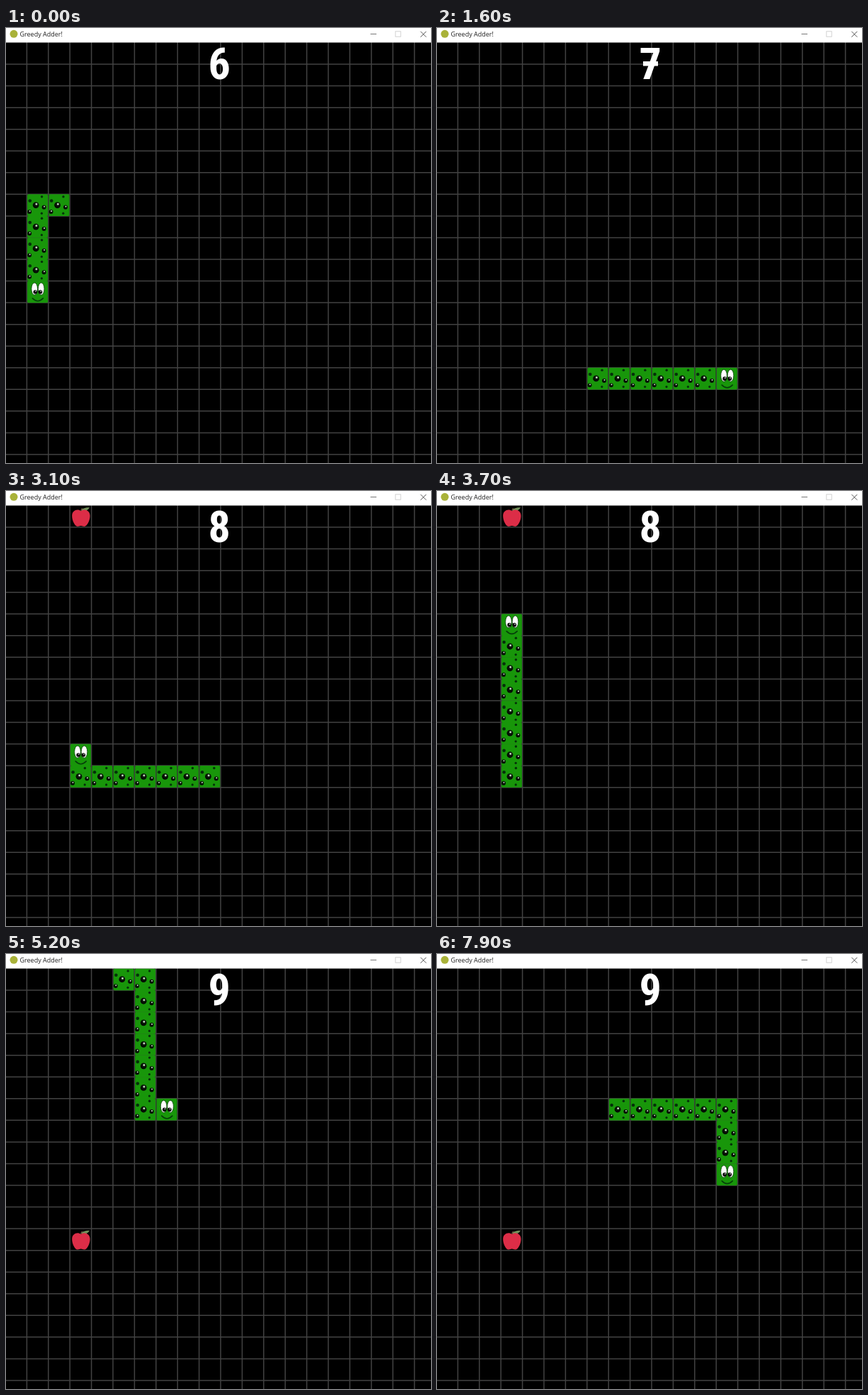
Animation, 600 px wide and 613 px high, one loop 8 s. Source, as an HTML page:

```html
<!DOCTYPE html>
<html lang="en">
<head>
<meta charset="utf-8">
<title>Greedy Adder!</title>
<style>
  html, body { margin: 0; width: 100%; height: 100%; overflow: hidden; background: #000; }
  svg { display: block; width: 100%; height: 100%; }
  .title { font: 9px "Open Sans", sans-serif; fill: #222; }
  .score, .pause { font-family: "Roboto Condensed", Roboto, sans-serif; font-stretch: 75%; }
  .score { font-size: 62px; font-weight: 900; fill: #fff; text-anchor: middle; }
  .pause { font-size: 32px; font-weight: 700; fill: #f6a01c; }
</style>
</head>
<body>
<svg viewBox="0 0 600 613" xmlns="http://www.w3.org/2000/svg">
  <defs>
    <radialGradient id="bead" cx=".58" cy=".34" r=".6">
      <stop offset="0" stop-color="#fff"/>
      <stop offset=".2" stop-color="#9db89a"/>
      <stop offset=".36" stop-color="#0b1a0a"/>
      <stop offset="1" stop-color="#020602"/>
    </radialGradient>
    <g id="skin">
      <rect x=".7" y="0" width="29" height="30.7" rx="1.6" fill="#18960a"/>
    </g>
    <g id="body">
      <use href="#skin"/>
      <g fill="url(#bead)">
        <circle cx="12.8" cy="15.2" r="4.4"/>
        <circle cx="24.2" cy="18.2" r="3"/>
        <circle cx="3.8" cy="24.6" r="2.9"/>
      </g>
      <g fill="#05300a">
        <circle cx="4.4" cy="9.2" r="2.3"/>
        <circle cx="21.2" cy="3.4" r="1.7"/>
        <circle cx="21" cy="26.8" r="1.6"/>
      </g>
    </g>
    <g id="head">
      <use href="#skin"/>
      <g fill="#fff" stroke="#0b3d0b" stroke-width=".8">
        <ellipse cx="10.8" cy="11" rx="4.3" ry="8.6"/>
        <ellipse cx="20.3" cy="11" rx="4.3" ry="8.6"/>
      </g>
      <g fill="#080808">
        <circle cx="11.9" cy="15.4" r="2.8"/>
        <circle cx="19.1" cy="15.4" r="2.8"/>
      </g>
      <g fill="#fff">
        <circle cx="12.6" cy="14.4" r=".8"/>
        <circle cx="19.8" cy="14.4" r=".8"/>
      </g>
      <path d="M8 24.4Q15.4 32 23 24.4" fill="none" stroke="#06400a" stroke-width="1.7" stroke-linecap="round"/>
    </g>
    <g id="apple">
      <path d="M15.5 6.4C18 3.4 24 2.8 27.6 2.5C26.5 6.4 21 8.6 17 7.4Z" fill="#71905a"/>
      <path d="M15.6 8.5Q15.6 5.5 17.4 3.6" fill="none" stroke="#6a4a3a" stroke-width="1.3"/>
      <path d="M15.6 7.8C20 4 28.4 6.4 28.4 14.6C28.4 21 24.4 29.4 20.4 29.4C18 29.4 17.4 28.4 15.6 28.4C13.8 28.4 13 29.4 10.8 29.4C6.8 29.4 3 21 3 14.6C3 6.4 11.2 4 15.6 7.8Z" fill="#dc2d47"/>
    </g>
  </defs>

  <rect width="600" height="613"/>
  <path id="grid" fill="none" stroke="#424242" stroke-width="1.5"/>
  <use id="food" href="#apple"/>
  <g id="snake"></g>
  <text class="score" id="score" x="301.3" y="71.5"></text>
  <rect id="bar" x="291" y="47" width="21" height="6.5" fill="#fff"/>
  <text class="pause" id="pause" x="38" y="337">GAME IS PAUSED. PRESS 'P' TO RESUME PLAYING.</text>

  <rect width="600" height="20.5" fill="#fff"/>
  <circle cx="11" cy="8.3" r="5.5" fill="#a9b239"/>
  <text class="title" x="19.5" y="12.2">Greedy Adder!</text>
  <g fill="none" stroke-width="1">
    <path d="M514.5 8.5h8.5" stroke="#777"/>
    <rect x="549.8" y="4.8" width="7.4" height="7.4" stroke="#d2d2d2"/>
    <path d="M585.3 4.8l8 8m0-8l-8 8" stroke="#555"/>
  </g>
</svg>
<script>
  const $ = id => document.getElementById(id);
  const LOOP = 8000, TICK = 100, MAX = 9, START = 5;
  const colX = c => -1 + 30.4 * c;
  const rowY = r => 20.5 + 30.55 * r;

  // Cells visited in order, beginning at the first tail cell
  const DIRS = { L: [-1, 0], R: [1, 0], U: [0, -1], D: [0, 1] };
  const trail = [[2, 7]];
  for (const [, d, n] of "L1D8R12U3L10U12R3D6R7D3".matchAll(/([LRUD])(\d+)/g)) {
    for (let i = 0; i < +n; i++) {
      const [x, y] = trail[trail.length - 1];
      trail.push([x + DIRS[d][0], y + DIRS[d][1]]);
    }
  }

  // Ticks at which each apple appears and is eaten
  const apples = [
    { cell: [9, 15], from: 3, to: 12 },
    { cell: [12, 12], from: 17, to: 20 },
    { cell: [3, 0], from: 24, to: 42 },
    { cell: [3, 12], from: 46, to: Infinity }
  ];
  const PAUSE = 57, RESUME = 75;

  function moves(tick) {
    if (tick >= RESUME) return tick - 19;
    if (tick >= PAUSE) return 55;
    return tick > 30 ? tick - 1 : tick;
  }

  function place(el, cell) {
    el.setAttribute("transform", `translate(${colX(cell[0])} ${rowY(cell[1])})`);
  }

  function show(el, on) {
    el.setAttribute("visibility", on ? "visible" : "hidden");
  }

  let grid = "";
  for (let i = 1; i < 20; i++) grid += `M${colX(i)} 20V613M0 ${rowY(i)}H600`;
  $("grid").setAttribute("d", grid);

  const parts = Array.from({ length: MAX }, (_, i) => {
    const el = document.createElementNS("http://www.w3.org/2000/svg", "use");
    el.setAttribute("href", i ? "#body" : "#head");
    $("snake").prepend(el);
    return el;
  });

  // Choose the type size that fills the message line
  const size = 32 * 528 / $("pause").getComputedTextLength();
  $("pause").style.fontSize = Math.min(size, 33) + "px";

  function draw(time) {
    const tick = Math.floor(time % LOOP / TICK);
    const head = START + moves(tick);
    const score = 6 + apples.filter(a => tick >= a.to).length;
    parts.forEach((el, i) => {
      show(el, i < score);
      if (i < score) place(el, trail[head - i]);
    });
    const apple = apples.find(a => tick >= a.from && tick < a.to);
    show($("food"), apple);
    if (apple) place($("food"), apple.cell);
    $("score").textContent = score;
    show($("bar"), score === 7);
    show($("pause"), tick >= PAUSE && tick < RESUME);
  }

  const begin = performance.now();
  function frame() {
    draw(performance.now() - begin);
    requestAnimationFrame(frame);
  }
  draw(0);
  requestAnimationFrame(frame);
</script>
</body>
</html>
```
